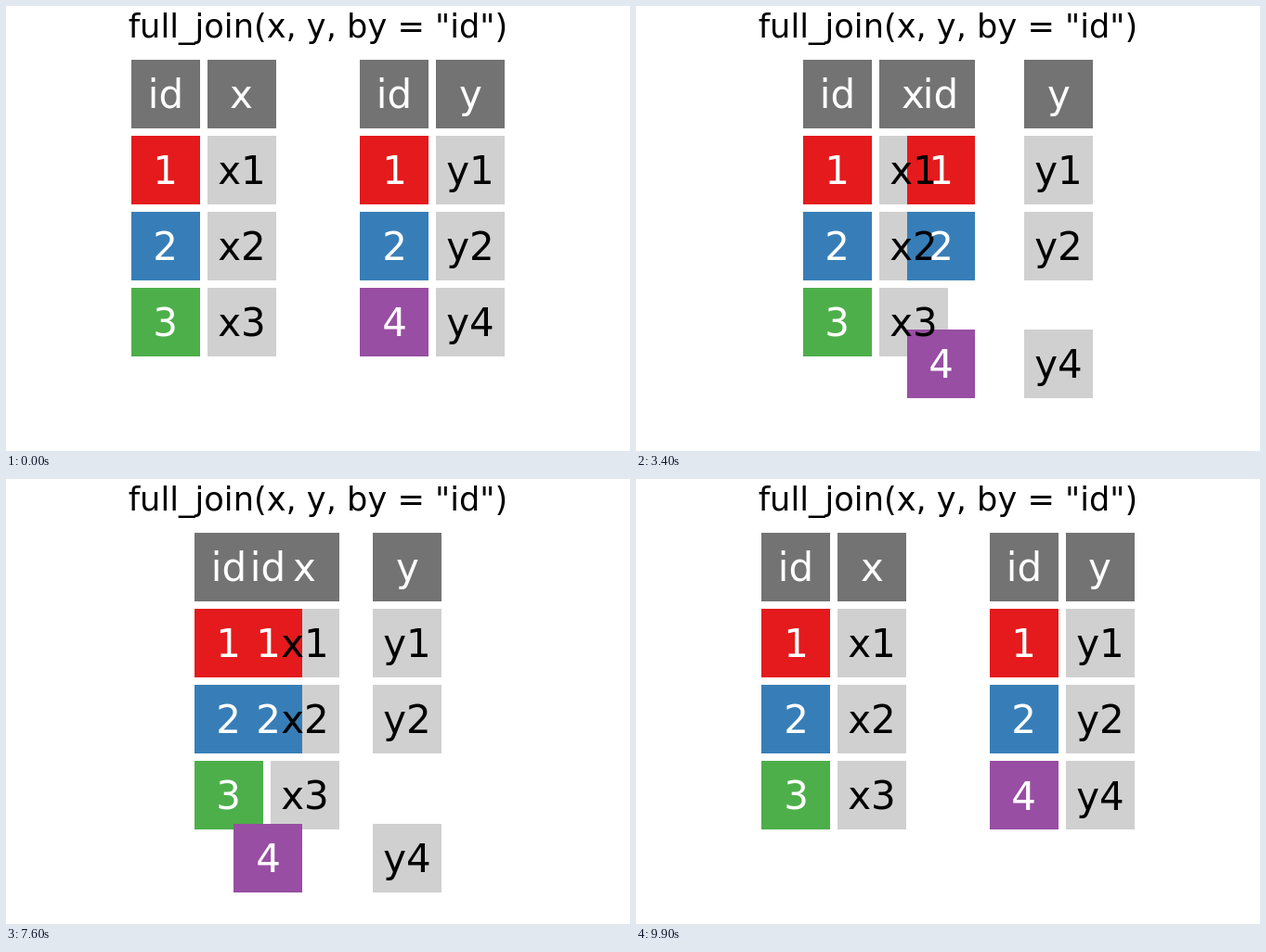
Animation, 672 px wide and 480 px high, one loop 10000 ms. Source, as an HTML page:

```html
<!DOCTYPE html>
<html lang="en">
<head>
<meta charset="utf-8">
<title>Full join</title>
<style>
  html, body { margin: 0; width: 100%; height: 100%; overflow: hidden; background: #fff; }
  svg { display: block; width: 672px; height: 480px; }
  text {
    font-family: "DejaVu Sans", Verdana, sans-serif;
    font-size: 42px;
    font-kerning: none;
    text-anchor: middle;
  }
  .title { font-size: 35.2px; }
</style>
</head>
<body>
<svg viewBox="0 0 672 480">
  <text class="title" x="336" y="34">full_join(x, y, by = "id")</text>
  <g id="tiles"></g>
  <g id="labels"></g>
</svg>
<script>
const LOOP = 10000, STEP = 100;
const UNIT = 82, HALF = 36.9, TOP = 95, BASELINE = 15.5;
const NUDGE = 0.01; // settles labels that rest on a half pixel
const HEAD = '#737373', CELL = '#d0d0d0';
const KEY = { 1: '#e41a1c', 2: '#377eb8', 3: '#4daf4a', 4: '#984ea3' };

// Each column: resting centre, travel in units, nudge, labels from the top
const columns = [
  { x: 172, move: 1, nudge: -NUDGE, labels: ['id', '1', '2', '3'] },
  { x: 254, move: 1, nudge: -NUDGE, labels: ['x', 'x1', 'x2', 'x3'] },
  { x: 418, move: -2, nudge: NUDGE, labels: ['id', '1', '2', '4'] },
  { x: 500, move: -1, nudge: NUDGE, labels: ['y', 'y1', 'y2', 'y4'] }
];

function add(parent, name, fill) {
  const el = document.createElementNS('http://www.w3.org/2000/svg', name);
  el.setAttribute('fill', fill);
  return document.getElementById(parent).appendChild(el);
}

function set(el, attrs) {
  for (const key in attrs) el.setAttribute(key, attrs[key]);
}

const cells = columns.flatMap(col => col.labels.map((label, row) => {
  const tile = add('tiles', 'rect', row ? KEY[label] || CELL : HEAD);
  const text = add('labels', 'text', row && !KEY[label] ? '#000' : '#fff');
  text.textContent = label;
  return {
    tile, text, col,
    y: TOP + row * UNIT,
    drop: label.endsWith('4') ? 1 : 0,
    offset: label.length === 1 ? 0.5 : 0
  };
}));

function ease(t, from, to) {
  const u = Math.min(1, Math.max(0, (t - from) / (to - from)));
  return (1 - Math.cos(Math.PI * u)) / 2;
}

function draw(p) {
  for (const { tile, text, col, y, drop, offset } of cells) {
    const cx = col.x + col.move * UNIT * p;
    const cy = y + drop * UNIT * p;
    const left = Math.round(cx - HALF), top = Math.round(cy - HALF);
    set(tile, {
      x: left,
      y: top,
      width: Math.round(cx + HALF) - left,
      height: Math.round(cy + HALF) - top
    });

    const nx = col.move < 0 ? col.nudge * (1 - 2 * p) : col.nudge;
    const ny = NUDGE * (2 * drop * p - 1);
    set(text, {
      x: Math.round(cx - offset + nx) + offset,
      y: Math.round(cy + BASELINE + ny)
    });
  }
}

let shown = -1;
function tick(now) {
  const step = Math.floor(now / STEP + 0.01) % (LOOP / STEP);
  if (step !== shown) {
    shown = step;
    const t = step * STEP;
    draw(ease(t, 1600, 5000) - ease(t, 6700, 10000));
  }
  requestAnimationFrame(tick);
}
tick(0);
</script>
</body>
</html>
```
